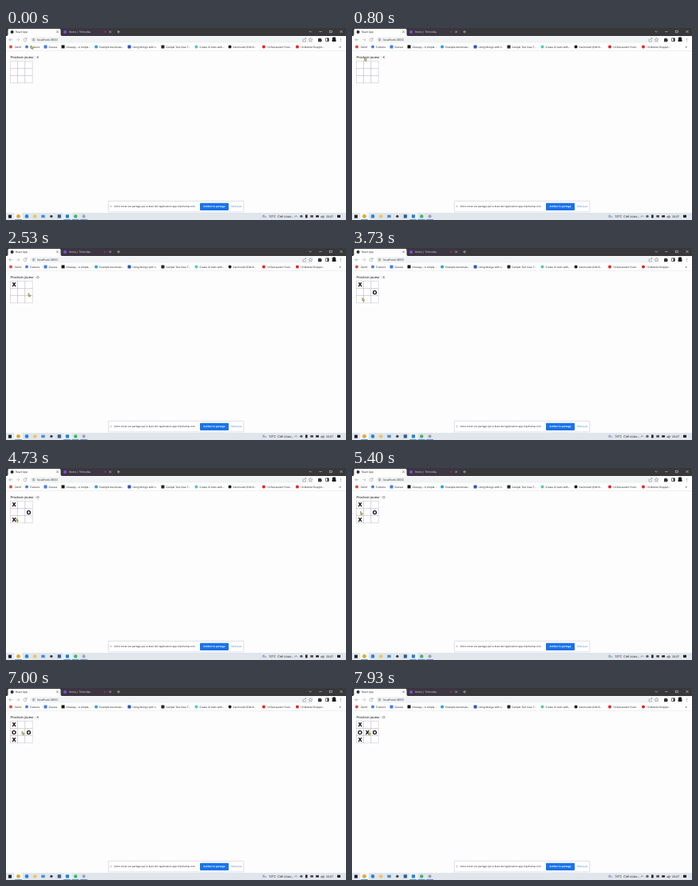
Write an HTML page that moves like this. It is 426 by 240 pixels and loops after 8000 ms.

```html
<!DOCTYPE html>
<html lang="fr">
<head>
<meta charset="utf-8">
<title>Tic-tac-toe</title>
<style>
html, body { margin: 0; width: 100%; height: 100%; overflow: hidden; background: #fdfdfd; }
svg { display: block; width: 100vw; height: 100vh; }
text { font-family: "Open Sans", "Noto Sans", sans-serif; text-rendering: geometricPrecision; white-space: pre; }
.game { font-family: "Liberation Sans", Arial, sans-serif; }
</style>
</head>
<body>
<svg id="stage" viewBox="0 0 426 240"></svg>
<script>
const NS = "http://www.w3.org/2000/svg";
const stage = document.getElementById("stage");
const LOOP = 8000;

function add(tag, attrs, content) {
  const el = document.createElementNS(NS, tag);
  for (const key in attrs) el.setAttribute(key, attrs[key]);
  if (content !== undefined) el.textContent = content;
  stage.appendChild(el);
  return el;
}
const rect = (x, y, width, height, fill, more) => add("rect", { x, y, width, height, fill, ...more });
const dot = (cx, cy, r, fill, more) => add("circle", { cx, cy, r, fill, ...more });
const line = (d, stroke = "#666", width = 0.55) =>
  add("path", { d, stroke, fill: "none", "stroke-width": width, "stroke-linecap": "round", "stroke-linejoin": "round" });
const label = (x, y, s, size = 3.2, fill = "#181818", more) =>
  add("text", { x, y, "font-size": size, fill, ...more }, s);
const cross = (x, y, r, color) =>
  line(`M${x - r} ${y - r}l${2 * r} ${2 * r}m0 ${-2 * r}l${-2 * r} ${2 * r}`, color);

function drawTabs() {
  rect(0, 0, 426, 10, "#38373a");
  rect(70, 0.5, 66, 9.5, "#3b3641");
  add("path", { d: "M1 10Q2.5 10 2.5 8V2.5Q2.5 1 4 1H67Q68.5 1 68.5 2.5V8Q68.5 10 70 10Z", fill: "#fdfdfd" });
  dot(7.6, 4.9, 2, "#24303a");
  label(12, 6, "React App");
  cross(64.5, 4.8, 1, "#444");
  dot(74, 4.9, 2, "#8a4be0");
  label(79, 6, "Home | Trimvolka", 3.2, "#f4f4f4");
  dot(124, 4.8, 1.1, "#b0304a");
  cross(130.5, 4.8, 1, "#ddd");
  line("M139.5 4.8h3m-1.5 -1.5v3", "#ddd");
  line("M380 4l1.3 1.3 1.3 -1.3M392.7 4.6h2.6", "#ddd");
  rect(405.7, 3.2, 2.6, 2.6, "none", { stroke: "#ddd", "stroke-width": 0.5 });
  cross(420, 4.5, 1.3, "#ddd");
}

function drawToolbar() {
  rect(0, 10, 426, 18.5, "#fdfdfd");
  line("M8 14.7h-4l1.7 -1.7m-1.7 1.7l1.7 1.7", "#8e8e88");
  line("M13 14.7h4l-1.7 -1.7m1.7 1.7l-1.7 1.7", "#b4b4ae");
  line("M25.6 13.5A2 2 0 1 0 26 15.2M26 12.3v1.6h-1.6", "#8e8e88");
  rect(30.5, 11, 355, 7.4, "#f1f3f4", { rx: 3.7 });
  dot(34.6, 14.7, 1.5, "none", { stroke: "#777", "stroke-width": 0.5 });
  line("M34.6 14.5v.9M34.6 13.8v.05");
  label(39, 16, "localhost:3000", 3.8, "#333");
  line("M372 14v3h3.5v-1.2M373 15q.5 -2 3 -2m-1 -1l1 1 -1 1", "#888");
  add("path", { d: "M381.5 12.3l.7 1.7 1.8 .1-1.4 1.2 .5 1.8-1.6-1-1.6 1 .5-1.8-1.4-1.2 1.8-.1z", fill: "none", stroke: "#777", "stroke-width": 0.45 });
  add("path", { d: "M391 13.2h1.3a.8 .8 0 0 1 1.6 0h1.3v1.2a.8 .8 0 0 1 0 1.6v1.2h-4.2z", fill: "#303236" });
  rect(400.5, 12.7, 3.8, 4, "none", { rx: 0.5, stroke: "#222", "stroke-width": 0.6 });
  rect(402.6, 12.7, 1.7, 4, "#222");
  dot(411, 13.6, 2.3, "#1c1b1b");
  rect(408.4, 14.6, 5.2, 2.4, "#1c1b1b", { rx: 1 });
  for (let i = -1; i <= 1; i++) dot(419.5, 14.7 + i * 1.5, 0.45, "#555");
}

function drawBookmarks() {
  // x, name, icon colour, text offset, icon corner radius
  const items = [
    [4, "Zemif", "#d94b3d", 7, 2], [24, "Traduire", "#4a80d6", 6, 2], [47.5, "Classes", "#3f7ee8", 6, 0.4],
    [69.5, "Dravopy – A simple…", "#161616", 6, 0], [111, "Example Automate…", "#2a9be0", 6, 2],
    [152.5, "Using Mongo with t…", "#2456c0", 6, 0.4], [194.5, "Sample Test Case T…", "#262626", 6, 0.4],
    [236.5, "Create UI tests with…", "#58c8b4", 6, 2], [278.5, "Karimovelt (Edit B…", "#161616", 6, 2],
    [321, "10 Restaurant Food…", "#ee1c1c", 6, 2], [363, "10 Mobile Shoppin…", "#ee1c1c", 6, 2]
  ];
  for (const [x, name, color, gap, rx] of items) {
    rect(x, 21.4, 4, 4, color, { rx });
    label(x + gap, 24.6, name, 3.15);
  }
  label(417.5, 24.8, "»", 4.5);
  rect(0, 28.2, 426, 0.4, "#dcdce2");
}

function drawShareBar() {
  rect(128.3, 216.3, 169.5, 13.6, "#fff", { rx: 0.6, stroke: "#cbc5dc", "stroke-width": 0.6 });
  line("M131.2 222l.8 1 -.8 1", "#666", 0.5);
  label(135.6, 224.4, "Votre écran est partagé par le biais de l'application app.clipchamp.com.", 3.08);
  rect(243, 218.7, 36, 9.2, "#1a73e8", { rx: 1 });
  label(261, 224.4, "Arrêter le partage", 3, "#fff", { "text-anchor": "middle", "font-weight": 700 });
  label(282, 224.4, "Masquer", 3.3, "#4a86e0");
}

function drawTaskbar() {
  rect(0, 231, 426, 9, "#e1e5ec");
  rect(10, 231, 11, 9, "#f4f6fa");
  rect(71.5, 231, 11, 9, "#eef1f7");
  for (const x of [11, 72, 82.5, 93]) rect(x, 239.2, 9, 0.8, "#3d86cf");
  rect(3, 233.6, 4, 4, "#202226");
  dot(15.5, 235.4, 2.4, "#e0a82e");
  dot(26, 235.4, 2.3, "#2388cf");
  rect(34, 233.6, 4.4, 3.6, "#e8c75a");
  rect(44.3, 233.7, 4.4, 3.4, "#3f8fcb");
  dot(56.8, 235.4, 1.7, "#39404a");
  rect(64.7, 233.3, 4.2, 4.2, "#2c5f8c");
  rect(74.8, 233.3, 4.2, 4.2, "#1f86d2");
  dot(87.2, 235.4, 2.2, "#43b65c");
  dot(97.5, 235.4, 2.1, "#a4a4ac");
  dot(322.8, 235, 1.5, "#8da9cb");
  rect(321.3, 235.2, 5.4, 1.9, "#a9bbd0", { rx: 0.9 });
  label(329.2, 236.9, "10°C  Ciel couv…", 4.1);
  line("M362 236l1.4 -1.4 1.4 1.4", "#333");
  dot(370, 235.4, 1.7, "#58606c");
  rect(375.2, 233.5, 2.4, 3.9, "#16181c");
  rect(381.4, 234, 3.5, 2.8, "#5a4550");
  rect(388.2, 234.2, 3.8, 2.4, "#1c2024");
  line("M395 235.8h1l1.2 -1.1v2.8l-1.2 -1.1h-1zM398.2 234.8q.8 1 0 2", "#444");
  label(401, 236.7, "20:07", 3.6);
  rect(415, 233.7, 4, 3.2, "#1c2024", { rx: 0.4 });
}

const STEP = 9.2, LEFT = 5.5, TOP = 41.2;
// [time, cell, mark]
const moves = [[1400, 0, "X"], [2800, 5, "O"], [4250, 6, "X"], [5650, 3, "O"], [7350, 4, "X"]];
// [time, x, y] of the pointer tip
const path = [
  [0, 31.5, 22], [250, 31.5, 22], [1150, 7.6, 44], [1750, 7.6, 44], [2450, 28, 56.4], [2950, 28, 56.4],
  [3600, 12.9, 62], [4750, 12.6, 62.6], [5450, 10.6, 54], [6200, 10.6, 54], [7100, 20.4, 54], [LOOP, 20.4, 54]
];

rect(0, 0, 426, 240, "#fdfdfd");
drawTabs();
drawToolbar();
drawBookmarks();
drawShareBar();
drawTaskbar();

const status = label(5.4, 38.2, "", 4.2, "#181818", { class: "game" });
for (let i = 0; i < 9; i++) {
  rect(LEFT + (i % 3) * STEP, TOP + Math.floor(i / 3) * STEP, STEP, STEP, "#fff", { stroke: "#c2bec8", "stroke-width": 0.5 });
}
const marks = moves.map(([, cell, mark]) =>
  label(LEFT + (cell % 3 + 0.5) * STEP, TOP + (Math.floor(cell / 3) + 0.5) * STEP + 2.5, mark, 7.1, "#000",
    { class: "game", "font-weight": 700, "text-anchor": "middle", stroke: "#000", "stroke-width": 0.25 }));
const pointer = add("path", {
  d: "M0 0V4.2L1 3.4 1.7 4.8 2.3 4.5 1.7 3.1H3Z",
  fill: "#f3dc50", stroke: "#3c382c", "stroke-width": 0.4
});

function pointerAt(t) {
  const i = Math.max(1, path.findIndex(p => p[0] >= t));
  const [t0, x0, y0] = path[i - 1], [t1, x1, y1] = path[i];
  const u = (t - t0) / (t1 - t0), e = u * u * (3 - 2 * u);
  return [x0 + (x1 - x0) * e, y0 + (y1 - y0) * e];
}

function render(t) {
  const played = moves.filter(m => t >= m[0]).length;
  marks.forEach((el, i) => el.setAttribute("visibility", i < played ? "visible" : "hidden"));
  status.textContent = "Prochain joueur : " + "XO"[played % 2];
  pointer.setAttribute("transform", `translate(${pointerAt(t)})`);
}

const start = performance.now();
function tick() {
  render((performance.now() - start) % LOOP);
  requestAnimationFrame(tick);
}
tick();
</script>
</body>
</html>
```
